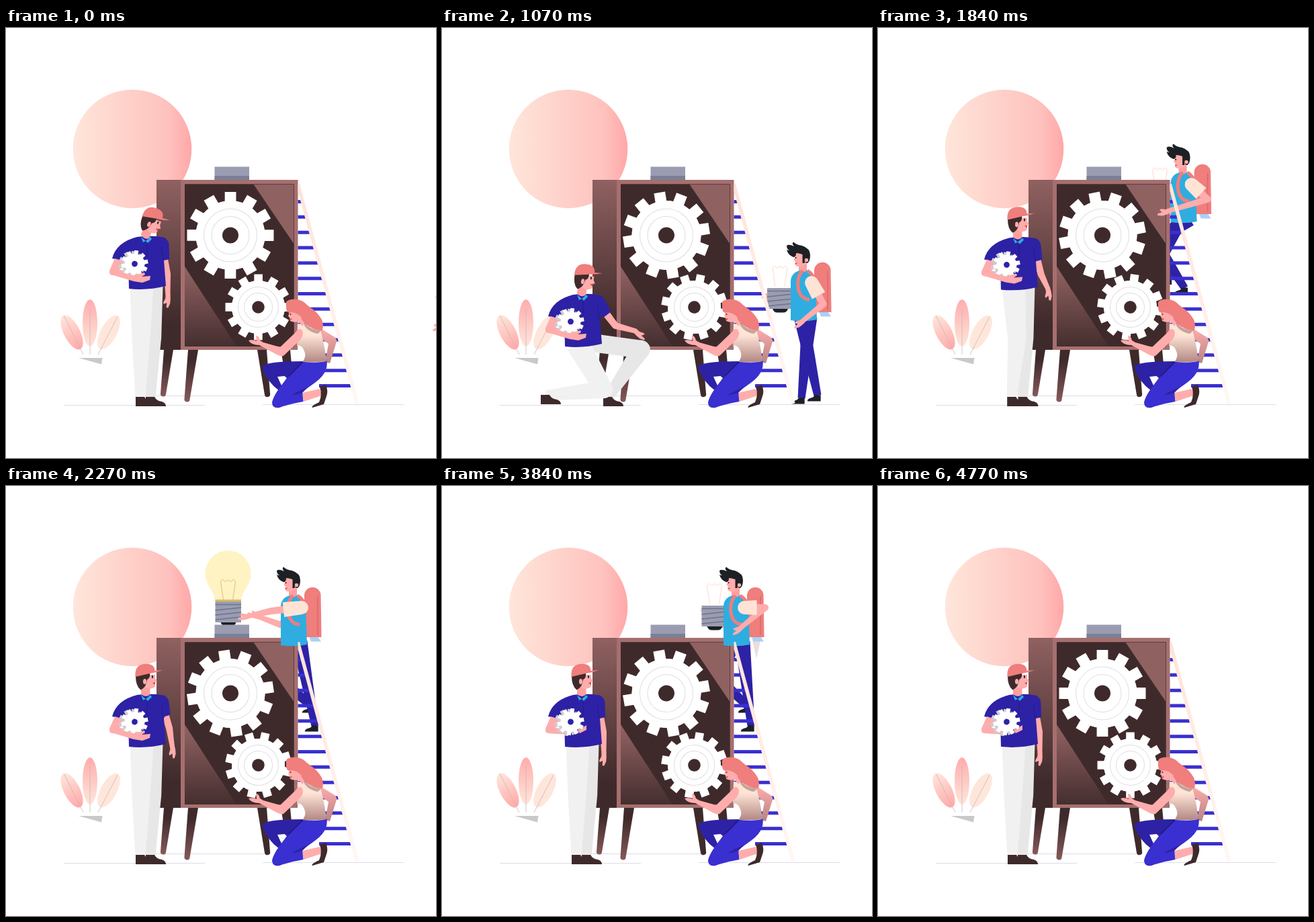
Recreate the animation shown at these times as an HTML page. Size 640 px wide and 640 px high, loop 4800 ms.

```html
<!DOCTYPE html>
<html lang="en">
<head>
<meta charset="utf-8">
<title>Workshop</title>
<style>
html,body{margin:0;width:100%;height:100%;overflow:hidden;background:#fff}
svg{display:block;width:100vw;height:100vh}
</style>
</head>
<body>
<svg viewBox="0 0 640 640">
<defs>
<linearGradient id="sun"><stop offset="0" stop-color="#ffe6da"/><stop offset=".5" stop-color="#fecfc8"/><stop offset=".8" stop-color="#fec2be"/><stop offset="1" stop-color="#ffa8a8"/></linearGradient>
<linearGradient id="side" x2="0" y2="1"><stop offset="0" stop-color="#906161"/><stop offset=".85" stop-color="#3f2a2b"/></linearGradient>
<linearGradient id="glow" x2="0" y2="1"><stop offset="0" stop-color="#936363"/><stop offset="1" stop-color="#452e2f"/></linearGradient>
<linearGradient id="foot" x2="0" y2="1"><stop offset=".2" stop-color="#3f2a2b"/><stop offset="1" stop-color="#865959"/></linearGradient>
<linearGradient id="rail" x2="0" y2="1"><stop offset="0" stop-color="#ffe2d6"/><stop offset="1" stop-color="#fff8f5"/></linearGradient>
<linearGradient id="top" x2="0" y2="1"><stop offset=".3" stop-color="#ffe4d6"/><stop offset="1" stop-color="#b28883"/></linearGradient>
<linearGradient id="back" x2="0" y2="1"><stop offset="0" stop-color="#ffacac"/><stop offset="1" stop-color="#b58482"/></linearGradient>
<linearGradient id="leaf" x2="0" y2="1"><stop offset="0" stop-color="#ffacac"/><stop offset="1" stop-color="#ffe6da"/></linearGradient>
<linearGradient id="leaf2" x2="0" y2="1"><stop offset="0" stop-color="#ffe6da"/><stop offset="1" stop-color="#ffa8a8"/></linearGradient>
</defs>
<rect width="640" height="640" fill="#fff"/>
<circle cx="188" cy="180" r="88.3" fill="url(#sun)"/>
<path d="M86 561.5H296M220 547.5H390M382 560.5H592" stroke="#dcdce8"/>

<g id="plant">
<ellipse cx="98" cy="453" rx="12" ry="28" transform="rotate(-27 98 453)" fill="url(#leaf2)"/>
<ellipse cx="125" cy="439" rx="11" ry="35" fill="url(#leaf)"/>
<ellipse cx="153" cy="453" rx="12" ry="28" transform="rotate(28 153 453)" fill="#ffe6da"/>
<path d="M86 428L115 486M125 417V486M166 430L137 486" fill="none" stroke="#c9b7b7" stroke-width=".8"/>
<path d="M108 491H143.500L142 500.500Z" fill="#c9c9c9"/>
</g>

<g id="legs"><path id="legA" fill="#2d22a5"/><path id="shoeA" fill="#1d2024"/><path id="legB" fill="#2d22a5"/><path id="shoeB" fill="#1d2024"/></g>
<g id="far" fill="#ffacac"><path/><path/></g>
<g id="bulb">
<path id="glass" d="M-19.500 0C-19.500 -17 -34 -22 -34 -42A34 34 0 0 1 34 -42C34 -22 19.500 -17 19.500 0Z"/>
<path id="wire" d="M-7 -2L-11 -30L-8 -33L-4 -29.500L0 -32.500L4 -29.500L8 -33L11 -30L7 -2" fill="none"/>
<rect x="-19" width="38.500" height="31" fill="#9a9db2"/>
<rect id="rim" x="-19" y="-3" width="38.500" height="3" fill="#d9bd62"/>
<path d="M-19 4.500H19.500M-19 13L19.500 9M-19 20L19.500 16M-19 27L19.500 23" stroke="#6e7288" stroke-width="1.600"/>
<path d="M-11 31H12Q10 36.500 5 36.500H-4Q-9 36.500 -11 31" fill="#1d2024"/>
</g>
<path d="M310.500 206.500H362V226.500H310.500Z" fill="#9a9db2"/><path d="M310.500 220H362V226.500H310.500Z" fill="#7b7f95"/>

<g id="cabinet">
<g fill="url(#foot)"><path d="M235 479H249L238 545A4 4 0 0 1 230 544Z"/><path d="M271 479H286L273.500 553A4 4 0 0 1 265.500 552Z"/></g>
<path d="M374 479H388L393 544A4 4 0 0 1 385 546ZM409 479H423L430 553A4 4 0 0 1 422 553Z" fill="#3f2a2b"/>
<path d="M224 226H262V479H224Z" fill="url(#side)"/>
<path d="M224 226H262V231H224Z" fill="#8f6060"/>
<path d="M260 226H434.500V479H260Z" fill="#a66f6f"/>
<path d="M266 232H429V474H266Z" fill="#3f2a2b"/>
<path d="M368 232H429V322Z" fill="#906161"/>
<path d="M266 355V474H343Z" fill="url(#glow)"/>
<path d="M266 232.500H428.500V474" fill="none" stroke="#5a3d3e"/>
</g>
<g id="big"></g><g id="small"></g>

<g id="upper">
<path id="flame" fill="#eadfdd"/>
<path d="M574 422H587L592 429.500H577Z" fill="#a9d1f6"/>
<path d="M567 423V360A12.300 12.300 0 0 1 591.500 360L592.500 423Z" fill="#ef7e7c"/>
<path d="M587 362V420" stroke="#d96a6c" stroke-width="1.500"/>
<path d="M544 349H556V361Q556 366 549 366L544 362Z" fill="#ff9f9f"/>
<path d="M532 376Q533 364 545 361Q552 366 557 360Q566 366 569 381L571 434Q552 438 532 435Z" fill="#2fade0"/>
<path d="M550 361C538 372 540 404 560 404M557 361Q566 367 569 378" fill="none" stroke="#ef7e7c" stroke-width="5"/>
<path d="M539 334L538.500 341L536.500 345L538.500 347V352Q540 356 548 355L556 350L557 334Z" fill="#ffacac"/>
<path d="M526 324Q529 321 537 325Q533 321 536 318.500Q541 323 549 324Q561 328 561 338Q561 347 557 350L553.500 349V341L552.500 350H549.500V337Q544 335 540 335Q540 341 536 341Q528 338 526 330Q528 331 530 331Q526 329 526 324Z" fill="#1d2024"/>
<circle cx="555.500" cy="345.500" r="2.700" fill="#ffacac"/>
<circle cx="539.500" cy="342" r="1.100" fill="#1d2024"/><path d="M538.500 350L542 349.500Q541 352 538.800 351.500" fill="#e2433f"/>
<g id="near" fill="#ffacac"><path/><path/></g>
<path id="sleeve2" fill="#ffe4d6"/>
</g>

<g id="ladder"><g id="rungs" fill="#3a2fd0"></g><path d="M434.500 232H437L525.500 558L520 560L434.500 243Z" fill="url(#rail)"/></g>

<g id="woman">
<path d="M468 447L489 460Q493 464 492 467L482 499L475 497L480 470L470 463Z" fill="url(#back)"/>
<path d="M434 470H448V498H434Z" fill="#fff"/>
<path d="M381 505Q383 496 442 496L446 503L426 522L410 541Q398 536 386 517Z" fill="#2d22a5"/>
<path d="M404 519L414.500 518L418 521L410 532Z" fill="#fff"/>
<path d="M420 518L441 497H446L425 520Z" fill="#1d1675"/>
<path d="M441 543L467 537L470 547L443 556Z" fill="#ffacac"/>
<path d="M443 497Q470 499 477.500 495Q480 513 461 527Q449 536 441 541L442.500 556Q420 560 407 565Q396 567 396 557Q399 543 421 519Z" fill="#3a2fd0"/>
<path d="M425 547Q433 541 450 534L441 543Z" fill="#2d22a5"/>
<path d="M467 534L476 531Q480 540 477 548L473 560L456 565Q453 563 466 557Q471 546 467 534Z" fill="#3f2a2b"/>
<path d="M434 440L466 443Q474 468 477 496Q462 498 441 497Q449 488 442 477Q438 471 433 473Z" fill="url(#top)"/>
<path d="M431 453Q436 446 440 449Q445 455 438 464L413 488Q408 489 403 486L377 472Q365 472 361 465Q367 463 373 466L372 458Q376 457 378 465L383 468L408 475Z" fill="#ffacac"/>
<path d="M422 416L421 426L420 429L422 431L423 436Q428 439 436 437L441 444L446 438L440 418Z" fill="#ffacac"/>
<path d="M445 438Q450 449 470 450L464 455Q451 453 444 443Z" fill="#c3a49c"/>
<path d="M417 412C415 404 426 403 433 404C444 405 447 413 456 418Q464 424 470 434Q473 442 471 450Q457 450 445 440Q438 432 440 431Q434 424 425 423Q416 427 417 412Z" fill="#ef7e7c"/>
<circle cx="423.500" cy="426" r="1" fill="#3f2a2b"/><path d="M422 433L426 432L424 435Z" fill="#e2433f"/>
</g>

<g id="fitter">
<path id="dark" fill="#e7e7e7"/><path id="shoeD" fill="#3f2a2b"/><path id="light" fill="#f1f1f1"/><path id="shoeL" fill="#3f2a2b"/>
<g id="body">
<g id="reach" fill="#ffacac"><path/><path/></g>
<path id="sleeve" fill="#2d22a5"/>
<path d="M195 311Q209 309 224 310Q239 311 241 327L235 346L238 384Q210 391 183 388L182 348L158 343Q164 319 195 311Z" fill="#2d22a5"/>
<path d="M210 315V350M234 346L231 326" stroke="#221989" fill="none"/>
<g id="head">
<path d="M201 297H214.500V310Q209 316 201 310Z" fill="#ff9f9f"/>
<path d="M203 281H222V286L225 291L222 292V298Q219 303 209 301L201 295Z" fill="#ffacac"/>
<path d="M193 283L214 278Q215 286 210 288L209 293L207 298Q202 304 200 303Q193 297 193 283Z" fill="#3f2a2b"/>
<ellipse cx="206.500" cy="291" rx="2.500" ry="4" fill="#ffacac"/>
<path d="M192.500 284Q191 267 205 265Q221 263 221.500 275L233 274Q224 278 214 279Z" fill="#ef7e7c"/>
<ellipse cx="218" cy="284" rx="1.200" ry="2.200" fill="#3f2a2b"/><path d="M218 293L222 292V296Z" fill="#e2433f"/>
</g>
<path d="M201 311L208 317L215 311L217 314L211 320L208 317L204 319Z" fill="#2fade0"/>
<path id="hold" d="M162 343L177 348L169 360L190 363V370L158 368Q153 367 154 361Z" fill="#ffacac"/>
<path id="tuck" d="M202 364L215 356V363L205 368Z" fill="#ffacac"/>
<g id="held"></g>
<path id="palm" d="M164 362L190 368L206 364L207 367L202 370L215 369L214 375L203 379L190 377L160 368Z" fill="#ffacac"/>
</g>
</g>
</svg>
<script>
const LOOP = 4800, SPIN = 4770;
const $ = id => document.getElementById(id);
const set = (id, name, value) => $(id).setAttribute(name, value);
const mix = (a, b, k) => a.map((v, i) => v + (b[i] - v) * k);
const part = (t, from, to) => Math.min(1, Math.max(0, (t - from) / (to - from)));
const ramp = (t, from, to) => { const u = part(t, from, to); return u * u * (3 - 2 * u); };
const pulse = (t, a, b, c, d) => ramp(t, a, b) - ramp(t, c, d);
const pts = list => 'M' + list.map(p => p.map(v => v.toFixed(2)).join(' ')).join('L') + 'Z';

// Ease through [time, pose] pairs.
function follow(track, t) {
  let [, now] = track[0];
  for (let i = 1; i < track.length; i++) now = mix(now, track[i][1], ramp(t, track[i - 1][0], track[i][0]));
  return now;
}

function gearPath(n, outer, root, half) {
  const out = [], inner = Math.sqrt(root * root - half * half);
  for (let i = 0; i < n; i++) {
    const a = i * 2 * Math.PI / n;
    for (const [x, y] of [[-half, -inner], [-half, -outer], [half, -outer], [half, -inner]])
      out.push([x * Math.cos(a) - y * Math.sin(a), x * Math.sin(a) + y * Math.cos(a)]);
  }
  return pts(out);
}
function wheel(id, outer, root, half, rings, hole) {
  $(id).innerHTML = `<path d="${gearPath(12, outer, root, half)}" fill="#fff"/><circle r="${root}" fill="#fff"/>` +
    rings.map(r => `<circle r="${r}" fill="none" stroke="#dedee2"/>`).join('') + `<circle r="${hole}" fill="#3f2a2b"/>`;
}
wheel('big', 64.5, 51.5, 8.4, [39.5, 28], 12);
wheel('small', 49, 39.5, 6.3, [30, 21], 9.3);

const mini = `<path d="${gearPath(10, 20, 14, 3)}"/><circle r="15"/>`;
$('held').innerHTML = `<g fill="#cdcdd2" transform="translate(187.5 352) rotate(8)">${mini}</g>` +
  `<g fill="#fff" transform="translate(191.5 351) rotate(8)">${mini}<circle r="4.4" fill="#2d22a5"/></g>`;

for (let i = 0; i < 13; i++) {
  const y = 256 + i * 22.83, left = y < 440 ? 434.5 : 466, right = 435 + (y - 238) * .274;
  $('rungs').innerHTML += `<path d="M${left} ${y}H${right}l1.4 5H${left}Z"/>`;
}

function taper(a, b, wa, wb) {
  const d = Math.hypot(b[0] - a[0], b[1] - a[1]) || 1, nx = (a[1] - b[1]) / d / 2, ny = (b[0] - a[0]) / d / 2;
  return pts([[a[0] + nx * wa, a[1] + ny * wa], [b[0] + nx * wb, b[1] + ny * wb],
    [b[0] - nx * wb, b[1] - ny * wb], [a[0] - nx * wa, a[1] - ny * wa]]);
}
const dot = (p, r) => `M${p[0] - r} ${p[1]}a${r} ${r} 0 1 0 ${2 * r} 0a${r} ${r} 0 1 0 ${-2 * r} 0Z`;
const limb = (a, b, c, [wa, wb, wc]) => taper(a, b, wa, wb) + dot(b, wb / 2) + taper(b, c, wb, wc);

// Knee between hip a and ankle c; side 1 bends to the right, -1 to the left.
function knee(a, c, l1, l2, side) {
  const dx = c[0] - a[0], dy = c[1] - a[1], d = Math.hypot(dx, dy);
  if (d >= l1 + l2) return mix(a, c, l1 / (l1 + l2));
  const k = (l1 * l1 - l2 * l2 + d * d) / (2 * d), h = side * Math.sqrt(Math.max(0, l1 * l1 - k * k));
  return [a[0] + (dx * k + dy * h) / d, a[1] + (dy * k - dx * h) / d];
}
const leg = (id, hip, ankle, l1, l2, side, widths) =>
  set(id, 'd', limb(hip, knee(hip, ankle, l1, l2, side), ankle, widths));
function shoe(id, ankle, sx, sy) {
  set(id, 'd', 'M-7 -1H6Q9 5 17 6Q23 8 23 13H-7Z');
  set(id, 'transform', `translate(${ankle}) scale(${sx} ${sy})`);
}

const HAND = 'M-2 -4L6 -5L14 -5L22 -2L21 1L13 1L16 6L13 7L6 4L-2 4Z';
function arm(id, shoulder, elbow, wrist, turn, flip) {
  const [skin, hand] = $(id).children;
  skin.setAttribute('d', limb(shoulder, elbow, wrist, [12, 10, 7]));
  hand.setAttribute('d', HAND);
  hand.setAttribute('transform', `translate(${wrist}) rotate(${turn}) scale(.85 ${.85 * flip})`);
}
const angle = (a, b) => Math.atan2(b[1] - a[1], b[0] - a[0]) * 180 / Math.PI;

// Fitter poses: elbow, wrist, hand angle.
const hang = [240, 366, 241, 398, 95], floor = [258, 357, 288, 365, 42],
  lift = [250, 362, 285, 353, 42], point = [271, 309, 304, 289, -10];
const reach = [[0, hang], [520, floor], [1120, floor], [1430, lift], [2050, hang], [2130, hang],
  [2850, point], [3250, point], [3750, hang]];

function fitter(t) {
  const low = pulse(t, 0, 520, 1130, 1900), dy = 86 * low;
  const L = mix([200, 550], [154, 547], low), D = mix([215, 550], [247, 550], low);
  set('body', 'transform', `translate(0 ${dy})`);
  set('head', 'transform', `rotate(${10 * low + 22 * (1 - ramp(t, 0, 520))} 207 308)`);
  leg('dark', [220, 382 + dy], D, 77, 87, 1, [27, 27, 15]);
  leg('light', [202, 384 + dy], L, 78, 87, 1, [35, 27, 15]);
  shoe('shoeD', D, 1, 1);
  shoe('shoeL', L, 1, 1);

  const [ex, ey, wx, wy, turn] = follow(reach, t), S = [231, 322], E = [ex, ey];
  arm('reach', S, E, [wx, wy], turn, turn > 70 ? 1 : -1);
  set('sleeve', 'd', taper(S, mix(S, E, .54), 23, 15) + dot(S, 11));
  const grip = ramp(t, 2500, 2800);
  set('tuck', 'opacity', grip);
  set('palm', 'opacity', 1 - grip);
}

// Climber poses: near elbow, near wrist, far wrist.
const swing = [535, 418, 500, 440, 507, 402], down = [573, 423, 577, 454, 507, 402],
  carry = [587, 401, 530, 418, 507, 402], grasp = [518, 384, 486, 391, 500, 393],
  present = [562, 409, 511, 390, 509, 412], hug = [594, 379, 560, 407, 514, 392];
const arms = [[0, swing], [670, down], [1430, carry], [1950, carry], [2270, grasp], [3000, present], [3480, grasp], [3840, hug]];

function place(t) {
  const climb = part(t, 1130, 2200), rise = part(t, 4200, 4720);
  const x = 151 - 164 * (1 - (1 - part(t, 0, 1130)) ** 3) - 110 * (1 - (1 - climb) ** 1.3)
    + 13 * ramp(t, 2270, 2700) - 3 * ramp(t, 3000, 3840) + 95 * ramp(t, 3840, 4500);
  return [x, -198 * ramp(t, 1130, 2200) - 430 * rise * rise];
}

function feet(t, x) {
  const still = part(t, 0, 670), walk = 2 * Math.PI * t / 335, stride = 12 * still - 28 * (1 - still) * Math.cos(walk);
  const hop = 9 * (1 - still) * Math.sin(walk);
  const onLadder = Math.sin(Math.PI * part(t, 1130, 2200)), step = Math.cos(2 * Math.PI * (t - 1130) / 600);
  const up = ramp(t, 1850, 2220), loose = ramp(t, 3840, 4150);
  const foot = (side, stand, hung) => {
    const ground = [560 + side * stride - 22 * onLadder, 549 - side * 2 - Math.max(0, side * hop) - 26 * onLadder * (1 - side * step)];
    return mix(mix(ground, [stand[0] - x, stand[1]], up), hung, loose);
  };
  return [foot(1, [456, 527], [556, 545]), foot(-1, [460, 555], [568, 550])];
}

function bulb(t, d) {
  const seat = mix([330.5, 172], [336, 181], ramp(t, 2270, 2700));
  const hand = t < 2750 ? [516, 387] : [518.5, 376];
  const spot = mix([hand[0] + d[0], hand[1] + d[1]], seat, pulse(t, 1900, 2250, 3280, 3720));
  const on = pulse(t, 2170, 2240, 3120, 3240), heat = ramp(t, 2480, 2850);
  set('bulb', 'transform', `translate(${spot})`);
  set('glass', 'fill', `rgb(${mix([255, 243, 196], [246, 56, 2], heat).map(Math.round)})`);
  set('glass', 'opacity', on);
  set('rim', 'opacity', on * (1 - heat));
  set('wire', 'stroke', `rgb(${mix([255, 217, 201], mix([220, 192, 124], [221, 74, 18], heat), on).map(Math.round)})`);
}

function climber(t) {
  const d = place(t), [a, b] = feet(t, d[0]);
  for (const id of ['legs', 'far', 'upper']) set(id, 'transform', `translate(${d})`);
  leg('legA', [547, 430], a, 59, 60, -1, [21, 17, 11]);
  leg('legB', [560, 430], b, 59, 60, -1, [23, 17, 11]);
  shoe('shoeA', a, -.66, .66);
  shoe('shoeB', b, -.66, .66);

  const p = follow(arms, t), S = [563, 379], E = p.slice(0, 2), W = p.slice(2, 4);
  arm('near', S, E, W, angle(E, W), W[0] < E[0] ? 1 : -1);
  set('sleeve2', 'd', taper(S, mix(S, E, .6), 20, 22) + dot(S, 10));
  const elbow = [533, 405], wrist = p.slice(4);
  arm('far', [545, 388], elbow, wrist, angle(elbow, wrist), 1);
  const jet = 27 * ramp(t, 3700, 3840) + 43 * part(t, 3840, 4700);
  set('flame', 'd', `M574 424H588L581 ${424 + 1.15 * jet}Z`);
  bulb(t, d);
}

function draw(t) {
  const turn = 360 * part(t, 0, SPIN);
  set('big', 'transform', `translate(334 308.5) rotate(${turn})`);
  set('small', 'transform', `translate(375.5 415.5) rotate(${turn * 2})`);
  fitter(t);
  climber(t);
}

const start = performance.now();
function tick() {
  draw((performance.now() - start) % LOOP);
  requestAnimationFrame(tick);
}
draw(0);
requestAnimationFrame(tick);
</script>
</body>
</html>
```
